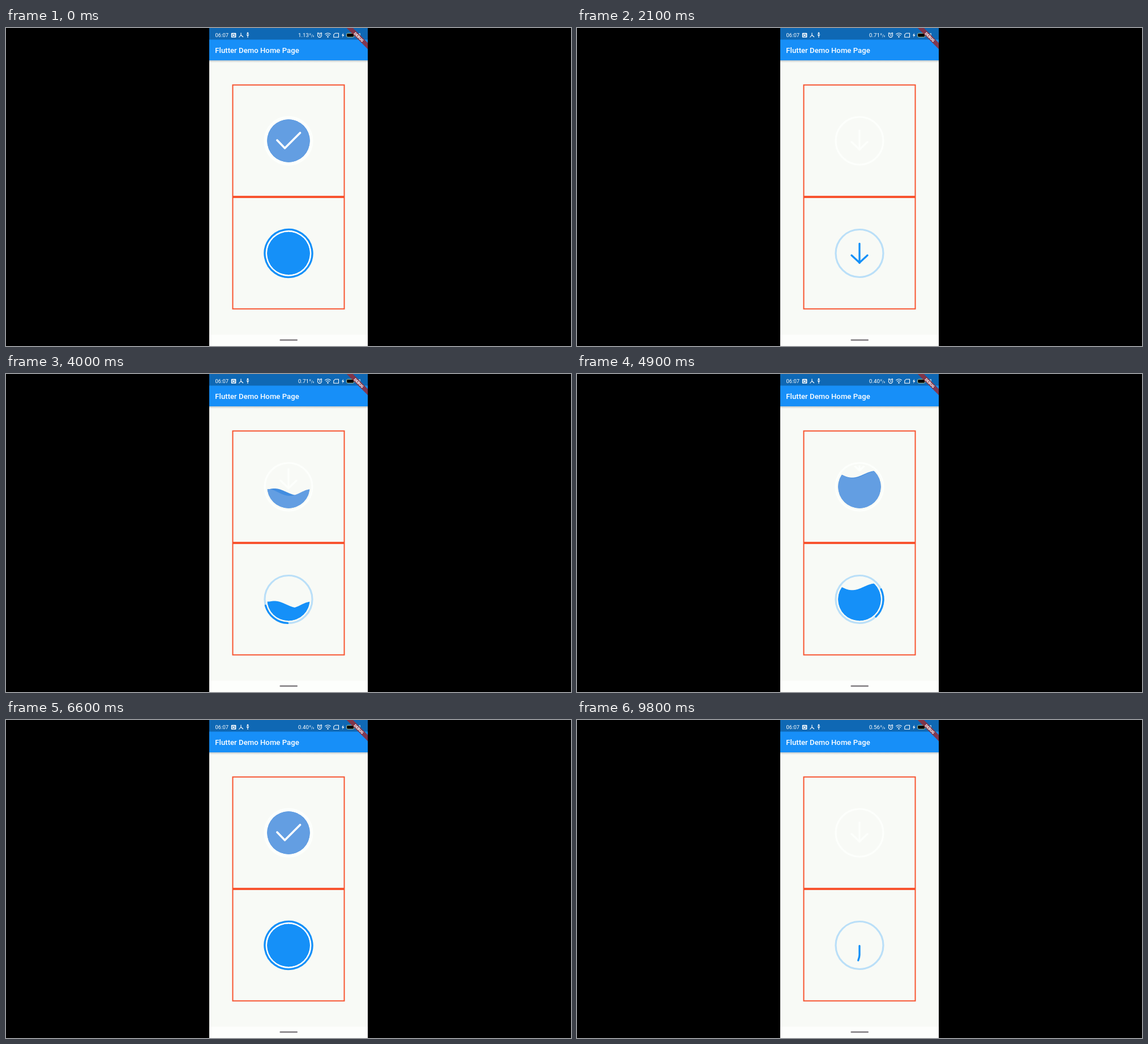
Animation, 998 px wide and 561 px high, one loop 9900 ms. Source, as an HTML page:

```html
<!DOCTYPE html>
<html lang="en">
<head>
<meta charset="utf-8">
<title>Download animation</title>
<style>
  html, body { margin: 0; width: 100%; height: 100%; overflow: hidden; background: #000; }
  svg { display: block; font-family: Roboto, sans-serif; }
  .line { fill: none; stroke-linecap: round; stroke-linejoin: round; }
  .icon { fill: none; stroke: #fff; stroke-width: 1.1; }
</style>
</head>
<body>
<svg width="998" height="561" viewBox="0 0 998 561">
  <defs>
    <clipPath id="screen"><rect x="359" width="280" height="561"/></clipPath>
    <clipPath id="disc"><circle r="37.7"/></clipPath>
    <linearGradient id="shade" x2="0" y2="1">
      <stop stop-color="#9aa6b0" stop-opacity=".6"/><stop offset="1" stop-color="#9aa6b0" stop-opacity="0"/>
    </linearGradient>
  </defs>
  <g clip-path="url(#screen)">
    <rect x="359" width="280" height="561" fill="#f8faf6"/>
    <rect x="359" y="541" width="280" height="20" fill="#fdfefc"/>
    <rect x="483.5" y="549.3" width="31.5" height="2.4" rx="1.2" fill="#807c80"/>
    <rect x="359" y="57" width="280" height="4" fill="url(#shade)"/>
    <rect x="359" y="20" width="280" height="37" fill="#178ff8"/>
    <rect x="359" width="280" height="20.5" fill="#0f68b4"/>
    <text x="369.3" y="43.8" font-size="13.2" font-weight="500" fill="#fff">Flutter Demo Home Page</text>

    <g fill="#fff">
      <text x="369.6" y="16" font-size="9.4">06:07</text>
      <text id="speed" x="516" y="16" font-size="9.7"></text>
      <text x="536" y="13" font-size="5">K</text>
      <text x="539" y="16" font-size="7">/</text>
      <text x="541.5" y="16" font-size="5.5">s</text>
      <rect x="397.8" y="8.8" width="8.6" height="8" rx="1"/>
      <path d="M596 8.5l-3 4.8h2l-1 3.6 3.3-5h-2z"/>
      <text x="617" y="16" font-size="9.4">91</text>
    </g>
    <path d="M400 11h4v4h-4z" fill="none" stroke="#0f68b4"/>
    <g class="icon">
      <path d="M415 8.5v4l-3.6 4M415 12.5l4 3.5M427 8v9M424.8 11.5l2.2 2.5 2.2-2.5M425.5 10l1.5-2 1.5 2"/>
      <circle cx="554" cy="12.8" r="3.6"/>
      <path d="M554 10.7v2.3h1.8M549.8 9.8l2-1.8M558.2 9.8l-2-1.8"/>
      <path d="M563.3 11.2q5.2-4.4 10.4 0M565.2 13.4q3.3-2.7 6.6 0"/>
      <circle cx="568.5" cy="15.6" r=".7"/>
      <path d="M581.5 9.2h6v7h-8.7v-4.5z"/>
    </g>
    <rect x="601.7" y="9.3" width="13" height="6.8" rx="2" fill="#000" stroke="#a9cfa8"/>
    <g transform="translate(639 0) rotate(45)">
      <rect x="-26.4" y="18.5" width="52.8" height="7.9" fill="#8f2e3c" fill-opacity=".88"/>
      <text y="24.8" font-size="6.5" font-weight="900" fill="#fff" text-anchor="middle">DEBUG</text>
    </g>

    <g fill="none" stroke="#f8532f" stroke-width="2">
      <rect x="400.5" y="100.5" width="197" height="196.5"/>
      <rect x="400.5" y="299" width="197" height="196.5"/>
    </g>

    <g transform="translate(499 199)">
      <circle class="line" r="42" stroke="#fdfffc" stroke-width="3.2"/>
      <circle class="line halo" r="39.3" stroke="#fdfffc" stroke-width="4"/>
      <g clip-path="url(#disc)">
        <path class="back" fill="#428de0"/>
        <path class="front" fill="#639ee2"/>
        <path id="floater" class="line" d="M0-18V15M-14 2L0 15.5 14 2" stroke="#fdfffc" stroke-width="3.3"/>
      </g>
      <path id="check" class="line" d="M-20-1L-6.5 13 20.5-14" stroke="#fff" stroke-width="3.6" pathLength="100"/>
    </g>

    <g transform="translate(499 397.5)">
      <circle class="line" r="42" stroke="#badff8" stroke-width="3.2"/>
      <circle class="line halo" r="39.2" stroke="#fff" stroke-width="3"/>
      <g clip-path="url(#disc)" fill="#1590f8"><path class="back"/><path class="front"/></g>
      <g class="line" stroke="#1590f8" stroke-width="3.3">
        <path id="barbs"/>
        <path id="stem" d="M0-17V17C0 25-5 29-6 41.5"/>
        <circle id="arc" r="42" pathLength="360"/>
      </g>
    </g>
  </g>
</svg>
<script>
const LOOP = 9900, CYCLE = 6100, START = 1300;
const $ = id => document.getElementById(id);
const each = (name, fn) => document.querySelectorAll('.' + name).forEach(fn);

// Piecewise linear value from [time, value] pairs
function track(t, ...keys) {
  if (t <= keys[0][0]) return keys[0][1];
  for (let i = 1; i < keys.length; i++) {
    const [t0, a] = keys[i - 1], [t1, b] = keys[i];
    if (t < t1) return a + (b - a) * (t - t0) / (t1 - t0);
  }
  return keys[keys.length - 1][1];
}

function trim(el, from, to) {
  const length = to - from;
  el.style.display = length > 0.1 ? '' : 'none';
  el.setAttribute('stroke-dasharray', `${length} 999`);
  el.setAttribute('stroke-dashoffset', -from);
}

function wave(level, crest, wavelength) {
  let d = 'M-39 40';
  for (let x = -39; x <= 39; x += 2)
    d += `L${x} ${(level - 6 * Math.cos(2 * Math.PI * (x - crest) / wavelength)).toFixed(2)}`;
  return d + 'L39 40Z';
}

const stemLength = $('stem').getTotalLength();

function draw(t) {
  const u = (t - START + CYCLE) % CYCLE;
  $('speed').textContent = ['1.13', '0.71', '0.40', '0.56'][Math.floor((t + 1500) / 3000)];

  const level = track(u, [2400, 46], [2700, 9.5], [4300, -46]);
  const drift = (u - 2700) * 0.06;
  each('back', el => el.setAttribute('d', wave(level - 0.5, drift - 25, 84)));
  each('front', el => el.setAttribute('d', wave(level + 0.5, drift * 1.2 + 41, 78)));
  each('halo', el => el.style.opacity = track(u, [3900, 0], [4300, 1]));

  $('floater').setAttribute('transform', `translate(0 ${Math.min(0, level - 22.5)})`);
  trim($('check'), 0, track(u, [4500, 0], [4800, 100]));

  const barb = track(u, [2000, 1], [2250, 0]);
  $('barbs').setAttribute('d', `M${-14 * barb} ${16.5 - 13 * barb}L0 16.5L${14 * barb} ${16.5 - 13 * barb}`);
  $('barbs').style.display = barb ? '' : 'none';
  trim($('stem'),
    track(u, [2200, 0], [2400, 18], [2680, stemLength]),
    track(u, [2200, 34], [2400, 44], [2500, stemLength]));

  const tail = track(u, [2500, 90], [2700, 92], [4500, 578], [4800, 620]);
  const head = track(u, [2500, 90], [2700, 165], [4500, 648], [4800, 980]);
  trim($('arc'), 0, head - tail);
  $('arc').setAttribute('transform', `rotate(${tail})`);
}

function tick() {
  draw(Math.floor(performance.now() % LOOP / 100) * 100);
  requestAnimationFrame(tick);
}
tick();
</script>
</body>
</html>
```
